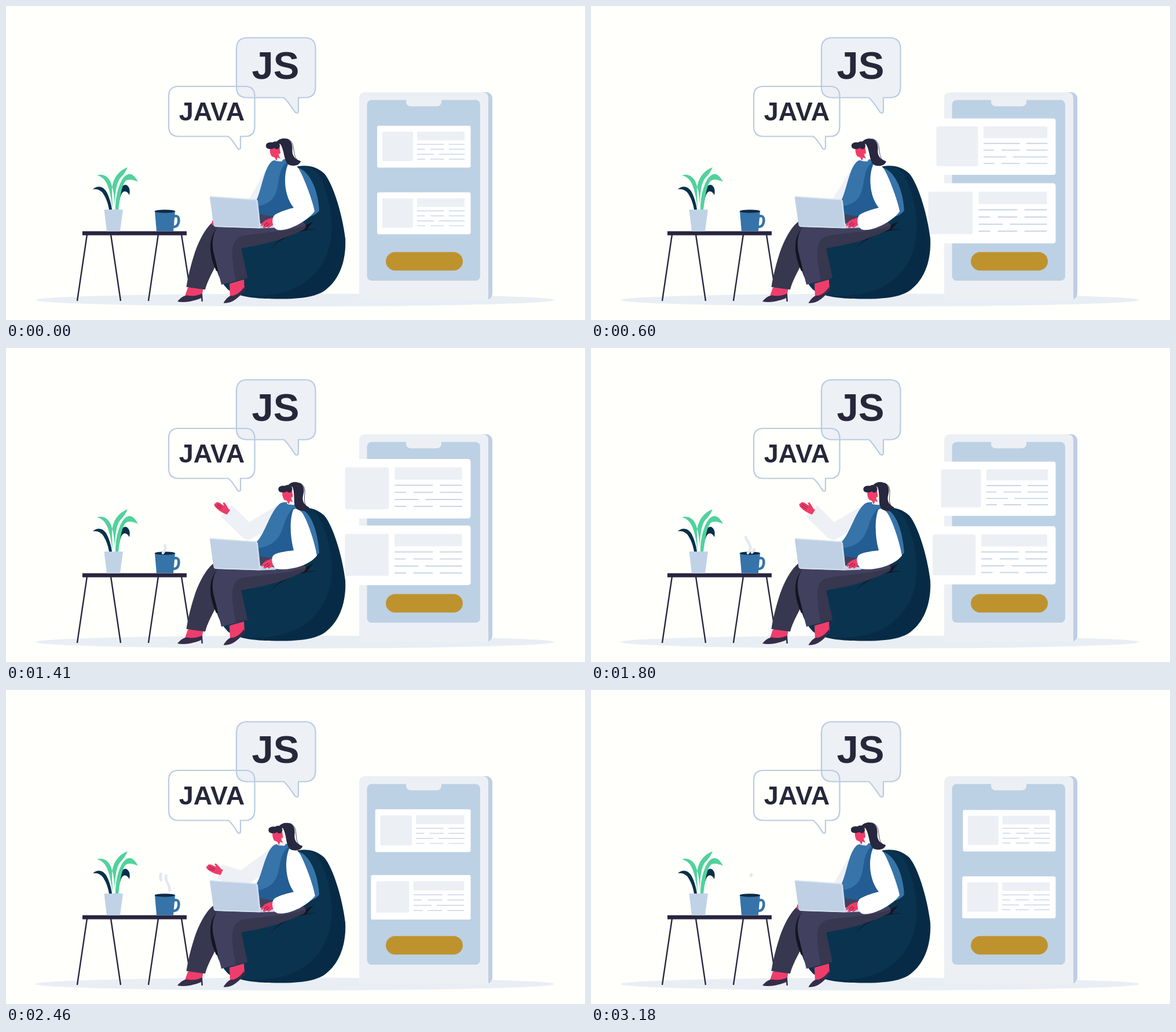
Recreate the animation shown at these times as an HTML page. Size 1000 px wide and 543 px high, loop 3.6 s.

```html
<!DOCTYPE html>
<html lang="en">
<head>
<meta charset="utf-8">
<title>Developer at work</title>
<style>
  html, body { margin: 0; width: 100%; height: 100%; overflow: hidden; background: #fffffb; }
  svg { display: block; width: 100vw; height: 100vh; }
  text { font: bold 67px "Liberation Sans", Arial, sans-serif; fill: #27273a; text-anchor: middle; }
  .navy { fill: #08304c; }
  .green { fill: #51d19d; }
  .ink { fill: #27273f; }
  .skin { fill: #ef3d6b; }
  .pants { fill: #41415f; }
  .pantsDark { fill: #37374f; }
  .pale { fill: #ecf0f5; }
  .shoe { fill: #352d49; }
  .crease { fill: #151522; }
  .bubble { stroke: #b9cbe2; stroke-width: 2.2; stroke-linejoin: round; }
  .steam { fill: none; stroke: #e3e7ef; stroke-width: 4.6; stroke-linecap: round; }
  .fine { fill: none; stroke: #8e2346; stroke-width: 1.1; }
</style>
</head>
<body>
<svg viewBox="0 0 1000 543" preserveAspectRatio="none">
  <defs>
    <g id="card">
      <rect x="-161.5" y="-36.2" width="161.5" height="72.4" rx="3" fill="#fff"/>
      <rect class="pale" x="-153" y="-26" width="53.5" height="51" rx="2.5"/>
      <rect class="pale" x="-92.5" y="-26" width="82" height="15"/>
      <path d="M-92.5-4.2h46.5m8.5 0h27M-92.5 4.4h13.5m9.5 0h23.5m8.5 0h27M-92.5 13.1h29m8.5 0h44.5M-92.5 21.5h14m9 0h23.5m8.5 0h27" stroke="#c0d0e2" stroke-width="1.2"/>
    </g>
  </defs>

  <ellipse cx="499" cy="508.500" rx="448" ry="11" fill="#e9eef5"/>

  <g id="phone">
    <rect x="630" y="149" width="210" height="359" rx="11" fill="#bdcfe3"/>
    <path class="pale" d="M610 508V160Q610 149 621 149H822Q833 149 833 160V508Z"/>
    <rect x="623.5" y="162.500" width="195.500" height="312.500" rx="8" fill="#bdd1e4"/>
    <path class="pale" d="M691 162H752V165Q752 173.500 743 173.500H700Q691 173.500 691 165Z"/>
    <rect x="656" y="425.500" width="133" height="32" rx="16" fill="#be932e"/>
    <use id="cardTop" href="#card"/>
    <use id="cardLow" href="#card"/>
  </g>

  <g id="table">
    <path d="M140 395L123 510M181 395L198 510M263 395L246 510M303 395L321 510" stroke="#27273f" stroke-width="2.400"/>
    <rect x="132" y="389.500" width="180" height="7" fill="#29243f"/>
    <path class="navy" d="M150 317C157 310 168 311 174 322C180 334 182 345 183 352H178C176 340 172 330 166 322C161 317 156 316 150 317ZM189 352L191 330C196 315 202 308 208 309.500C213 312 215 319 213 327C209 319 203 318 199 326C196 334 194 344 193 352Z"/>
    <path class="green" d="M157 293C166 289 178 294 182 308C187 322 188 340 188 352H184C182 335 180 320 174 307C170 299 164 294 157 293ZM210 279C196 284 184 297 183 318L184 352H188C188 325 190 308 197 298C203 292 207 286 210 279ZM189 352C189 325 198 292 213 290.500C221 291 225 299 228 304C221 301 212 298 206 303C198 315 197 335 194 352Z"/>
    <path d="M169.500 352H202L197 389.500H174Z" fill="#c0d2e5"/>
    <path d="M289 364C300 360 299 371 297.500 376C295.500 382 291 382 287 382" fill="none" stroke="#3673a8" stroke-width="4.500"/>
    <path d="M257 355H292L289 389.500H260Z" fill="#3673a8"/>
    <ellipse cx="274.500" cy="355" rx="17.800" ry="2.800" fill="#0b2a44"/>
    <path id="steamLeft" class="steam" pathLength="1" d="M271 354.500C279 345 274 340 270 333C266 327 266 322 267.500 318"/>
    <path id="steamRight" class="steam" pathLength="1" d="M278 353.500C286 346 282 340 279 334C276 328 275 324 277 319"/>
  </g>

  <g id="beanbag">
    <path d="M496 280C512 273 535 275 550 290C565 308 581 360 586 402C588 440 576 473 552 491C532 506 495 507 465 506.500C425 506 398 502 383 490C366 472 360 450 362 432L390 380H500Z" fill="#072b46"/>
    <path d="M496 280C514 273 530 277 540 291C557 322 566 365 561 402C555 448 524 482 483 494C450 503 420 503 396 498C367 480 360 450 362 432L390 380H500Z" fill="#0a334f"/>
    <path class="crease" d="M454 423C470 403 494 391 531 372L519 387C496 393 472 403 454 423ZM505 391Q520 385 537 386Q520 387 505 391Z"/>
  </g>

  <g id="woman">
    <path id="sleeveLeft" fill="none" stroke="#edf0f5" stroke-width="27" stroke-linejoin="round"/>
    <path id="vest" fill="#3774a9"/>
    <path id="vestShade" fill="#235d93"/>

    <path class="skin" d="M314 487L341 486L339 498C328 504 316 504 309 502Z"/>
    <path class="shoe" d="M296 511C302 504 309 499 316 501C326 502 333 500 339 497L340 511H337.500L337 505C326 510 308 514 296 511Z"/>
    <path class="pantsDark" d="M367 368C350 373 334 402 325 430C318 452 314 470 311.500 486L344 490.500C348 475 356 462 363 447C352 420 353 398 371 381Z"/>
    <path class="crease" d="M369 380C351 394 347 422 363 458L368 460C357 425 358 399 373 383Z"/>
    <path class="skin" d="M386 480L411 473L412 489C402 500 393 503 387 504Z"/>
    <path class="shoe" d="M375.500 513.500C380 506 387 499 392 501C402 498 407 492 411 486L413 496L410 494C400 507 388 515 375.500 513.500Z"/>
    <path class="pants" d="M367 380C355 395 355 415 360 432C364 448 368 466 372 482L417 470L406 419L420 416C460 410 495 396 515 386C522 380 515 371 500 370L438 360L436 378Z"/>
    <path class="pantsDark" d="M397 476L417 470L406 419L420 416C460 410 495 396 515 386L519 379C490 390 450 391 410 397C386 403 388 428 397 476Z"/>

    <g id="handLeft">
      <path class="skin" d="M-4.500 4C-7-6-7-14-4.500-22Q-2-26 1-23Q4-24 5-19L5-9L8-13Q11-13 9.500-9L5 1V4Z"/>
      <path class="fine" d="M-3-20L-2-9M1-20V-9"/>
    </g>

    <path d="M436 376L468 379.500L466 383.500L437 384.500L362 382Z" fill="#c7d6e7"/>
    <path d="M353.500 329L432 334.500Q434.500 335 435 337L440 384L361 381.500Q359 381 358.500 379L352 331Q352 329 353.500 329Z" fill="#bfd0e4"/>
    <path d="M353 329.700L431 335.300Q433 335.500 433.500 338L438.500 383.500L361 381" fill="none" stroke="#d9e4ef" stroke-width="1.500"/>

    <g id="handRight">
      <path class="skin" d="M463 366C453 367 443 372 440 379L441.500 381L446 378L443 383L447 384L450 381L453 384L464 377Z"/>
      <path class="fine" d="M452 374L445 380M455 376L449 382"/>
    </g>
    <path id="sleeveRight" fill="#fff"/>

    <g id="head">
      <path d="M463 266L469 262L481 263L476 269L466 268Z" fill="#f7f9fb"/>
      <path class="skin" d="M456 245L472 240L474 254L471 258L474 264L469 262L467 268L464 262L459 260C456 256 455 250 456 245Z"/>
      <g id="ponytail">
        <path class="ink" d="M466 236C472 229 479 228 486 230C494 233 495 242 494.500 249C494 258 498 265 509 268C508 275 498 278 489 275C479 269 482 252 474 239Z"/>
        <path d="M484 229.500C503 233 492 257 504 267" fill="none" stroke="#27273f" stroke-width=".8"/>
      </g>
      <path class="ink" d="M449 243C448 237 454 235 460 236C466 232 473 235 473 242C472 248 467 249 464 245.500C457 248.500 450 248 449 243Z"/>
      <circle cx="471.500" cy="256" r="1.100" fill="#e6b94a"/>
    </g>
  </g>

  <g id="bubbles">
    <path class="bubble" fill="#edf0f5" d="M417 55H516Q534.500 55 534.500 74V140Q534.500 158.500 516 158.500H505V181Q505 187 499.500 184C494 176 488 166 480 158.500H417Q398 158.500 398 140V74Q398 55 417 55Z"/>
    <path class="bubble" fill="none" d="M298 139H413Q429.500 139 429.500 156V208Q429.500 225.500 413 225.500H405V244Q405 249 400.500 247C396 240 391 231 384 225.500H298Q281 225.500 281 208V156Q281 139 298 139Z"/>
    <text x="465.500" y="126">JS</text>
    <text x="355.500" y="197.500" style="font-size:45px">JAVA</text>
  </g>
</svg>
<script>
const LOOP = 3600, STEP = 30, LAST = 3180;
const $ = id => document.getElementById(id);
const set = (id, name, value) => $(id).setAttribute(name, value);
const mix = (a, b, k) => a + (b - a) * k;
const clamp = k => Math.min(1, Math.max(0, k));
const smooth = (t, from, to) => {
  const k = clamp((t - from) / (to - from));
  return k * k * (3 - 2 * k);
};

// Linear interpolation through rows of [time, ...values].
function track(rows, t) {
  const next = rows.findIndex(row => row[0] > t);
  if (next === 0) return rows[0].slice(1);
  if (next < 0) return rows.at(-1).slice(1);
  const a = rows[next - 1], b = rows[next];
  const k = (t - a[0]) / (b[0] - a[0]);
  return a.slice(1).map((v, i) => mix(v, b[i + 1], k));
}

// Eases from 0 to 1, then rings around 1; swing is half a period.
function spring(t, start, arrive, swing) {
  if (t < start) return 0;
  if (t < arrive) return ((t - start) / (arrive - start)) ** 2;
  const u = (t - arrive) / swing;
  return 1 + 0.45 * 0.5 ** u * Math.sin(Math.PI * u);
}

function morph(a, b, k) {
  const to = b.match(/[\d.]+/g);
  let i = 0;
  return a.replace(/[\d.]+/g, n => mix(+n, +to[i++], k).toFixed(2));
}

// Each garment: upright pose, leaning pose.
const garments = {
  vest: [
    'M460 268C468 264 480 263 487 267L497 279C520 278 539 312 541 354C530 368 500 372 450 372L437 362L433 335C442 315 446 278 460 268Z',
    'M473 269C480 265 492 266 499 270L508 279C527 281 539 320 541 354C530 368 500 372 450 372L437 362L433 335C448 320 456 283 473 269Z'],
  vestShade: [
    'M485 270C467 284 474 315 462 331C455 341 445 344 436 346L438 360L464 368L500 360L490 280Z',
    'M498 276C479 290 481 318 467 331C459 341 447 344 436 346L438 360L464 368L500 360L500 284Z'],
  sleeveRight: [
    'M487 274C480 290 478 325 497 349C488 351 475 355 466 360C457 365 459 384 469 387C485 391 520 373 533 355C530 338 516 300 506 282C500 273 491 271 487 274Z',
    'M496 280C490 296 490 325 497 350C487 351 472 353 464 357C456 361 459 377 467 382C488 385 522 378 537 359C534 340 523 304 513 287C507 278 499 276 496 280Z']
};

// time, elbow x y, wrist x y, hand angle
const armRows = [
  [540, 425, 352, 379, 374, -92],
  [840, 418, 338, 390, 328, -50],
  [1080, 417, 318, 393, 292, -33],
  [1350, 418, 318, 381, 282, -56],
  [1800, 418, 318, 381, 282, -56],
  [2040, 418, 318, 382, 283, -52],
  [2460, 408, 327, 369, 314, -66],
  [2700, 425, 352, 379, 374, -92]
];

// time, tail, head
const steamRows = {
  steamLeft: [[1040, 0, 0], [1800, 0, .76], [2040, .38, .94], [2460, .72, 1], [2850, 1, 1]],
  steamRight: [[1650, 0, 0], [1800, 0, .18], [2040, 0, .48], [2460, .22, .95], [2600, .35, 1], [3180, .94, 1]]
};

function placeCard(id, y, rise, fall) {
  const scale = 1 + 0.413 * (rise - fall);
  set(id, 'transform', `translate(802.5 ${y}) scale(${scale})`);
}

function draw(t) {
  placeCard('cardTop', 243.3, spring(t, 145, 270, 240), spring(t, 1650, 1928, 285));
  placeCard('cardLow', 358.5, spring(t, 235, 380, 240), spring(t, 1728, 2030, 285));

  const lean = smooth(t, 480, 1410) - smooth(t, 2100, 2610);
  for (const id in garments) set(id, 'd', morph(...garments[id], lean));
  set('head', 'transform', `translate(${21.5 * lean} ${2.5 * lean})`);
  set('ponytail', 'transform', `rotate(${11 * lean} 478 236)`);
  set('handRight', 'transform', `translate(${lean} ${-2.5 * lean})`);

  const [ex, ey, wx, wy, angle] = track(armRows, t);
  set('sleeveLeft', 'd', `M${464 + 12 * lean} 284L${ex} ${ey}L${wx} ${wy}`);
  set('handLeft', 'transform', `translate(${wx} ${wy}) rotate(${angle})`);

  for (const id in steamRows) {
    const [tail, head] = track(steamRows[id], t);
    set(id, 'stroke-dasharray', `${head - tail} 3`);
    set(id, 'stroke-dashoffset', -tail);
    set(id, 'visibility', head - tail > .005 ? 'visible' : 'hidden');
  }
}

const began = performance.now();
function tick() {
  const t = (performance.now() - began) % LOOP;
  draw(t < 150 ? 0 : Math.min(LAST, Math.floor(t / STEP) * STEP));
  requestAnimationFrame(tick);
}
tick();
</script>
</body>
</html>
```
